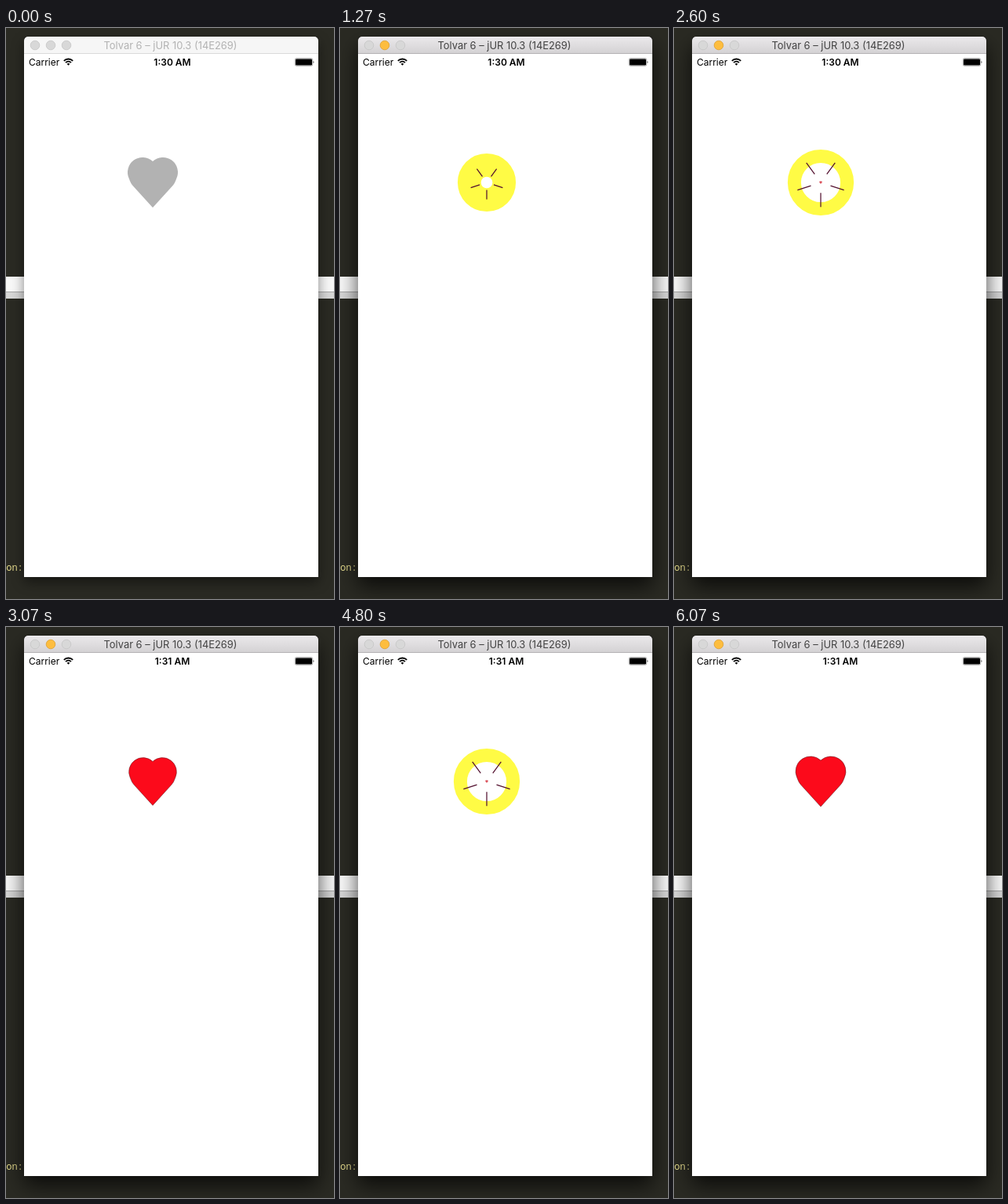
Animation of 418x728 px, one loop 6140 ms. Source, as an HTML page:

```html
<!DOCTYPE html>
<html lang="en">
<head>
<meta charset="utf-8">
<title>Like button</title>
<style>
  html, body { margin: 0; width: 100%; height: 100%; overflow: hidden; background: #2a2a23; }
  svg { display: block; width: 418px; height: 728px; font: 12px Inter, Roboto, sans-serif; }
  #shadow { filter: drop-shadow(0 7px 8px rgba(0, 0, 0, .45)); }
  #bar { fill: #f6f6f6; }
  #title { font-size: 12.9px; fill: #b2b2b2; text-anchor: middle; }
  .light { fill: #d8d8d8; stroke: #c6c6c6; stroke-width: .8; }
  .active #shadow { filter: drop-shadow(0 12px 13px rgba(0, 0, 0, .7)); }
  .active #bar { fill: url(#metal); }
  .active #title { fill: #424242; }
  .active #edge { stroke: #b4b2b4; }
  .active .yellow { fill: #fdbd3f; stroke: #dda033; }
  #edge { stroke: #dadada; }
  #clock { font-weight: 600; text-anchor: middle; }
  #code { font: 12px "Noto Sans Mono", "DejaVu Sans Mono", monospace; fill: #e3d98c; }
</style>
</head>
<body>
<svg id="stage" viewBox="0 0 418 728">
  <defs>
    <linearGradient id="metal" x2="0" y2="1">
      <stop stop-color="#ebe9eb"/><stop offset="1" stop-color="#d3d1d3"/>
    </linearGradient>
  </defs>
  <rect width="418" height="728" fill="#2a2a23"/>
  <rect y="317" width="418" height="19" fill="#f7f7f7"/>
  <rect y="336" width="418" height="1" fill="#a5a5a5"/>
  <rect y="337" width="418" height="8" fill="#d6d6d6"/>
  <text id="code" x="-7" y="692">ion:</text>

  <rect id="shadow" x="23" y="11" width="375" height="689" rx="4"/>
  <rect x="23" y="30" width="375" height="670" fill="#fff"/>
  <path id="bar" d="M23 33V16a5 5 0 0 1 5-5H393a5 5 0 0 1 5 5V33Z"/>
  <path id="edge" d="M23 32.5H398"/>
  <circle class="light" cx="37" cy="22" r="5.8"/>
  <circle class="light yellow" cx="57" cy="22" r="5.8"/>
  <circle class="light" cx="77" cy="22" r="5.8"/>
  <text id="title" x="209.5" y="27">Tolvar 6 – jUR 10.3 (14E269)</text>

  <text x="29" y="47.5">Carrier</text>
  <g fill="none" stroke="#000" stroke-width="1.8">
    <path d="M73.8 41.8a8.2 8.2 0 0 1 11.4 0M76 44.2a5 5 0 0 1 7 0"/>
    <path d="M79.5 47.8l-1.9-2a2.8 2.8 0 0 1 3.8 0Z" fill="#000" stroke="none"/>
  </g>
  <text id="clock" x="212" y="47.5"></text>
  <rect x="368.2" y="38.7" width="22.6" height="9.6" rx="2" fill="none" stroke="#888" stroke-width=".7"/>
  <rect x="369" y="39.5" width="21" height="8" rx="1.2"/>
  <path d="M391.6 42q1.8 1.5 0 3Z"/>

  <g id="button" transform="translate(187 197)">
    <circle id="ring" fill="none" stroke="#fffb45"/>
    <path id="lines" stroke="#541230" stroke-width="1.25"/>
    <path id="heart" stroke-width=".7" d="M0 32L-25 4.5Q-28 1.5-30.2-5A19 19 0 0 1 0-26.9A19 19 0 0 1 30.2-5Q28 1.5 25 4.5Z"/>
  </g>
</svg>
<script>
const LOOP = 6140, FOCUS = 1000, MINUTE = 2870, SIZE = 64;
const GRAY = [178, 178, 178], RED = [252, 10, 27];
// Press and release of each tap; taps alternate between like and unlike.
const TAPS = [[1067, 1178], [1970, 2070], [2325, 2460], [3790, 3940], [4470, 4660]];

// Keyframes are flat lists: time, value, time, value...
const RING = [0, 0, 1, .5, 2, 1, 3, 1.2, 4, 1.3, 5, 1.37, 6, 1.4];
const HOLE = [0, 0, 2, 0, 3, 1.25, 4, 2.688, 5, 3.923, 6, 4.375, 7, 4.731, 9, 5];
const TAIL = [1, 0, 2, .18, 3, .2, 4, .26, 5, .32, 6, .4, 7, .6, 8, .71, 17, .89, 18, .92];
const HEAD = [1, 0, 2, .32, 3, .48, 4, .64, 5, .68, 17, .92];
const FADE = [12, 1, 17, 0];
const BOUNCE = [4, 0, 9, 1.2, 10, 1.25, 11, 1.2, 14, .9, 15, .875, 16, .875, 17, .9, 20, 1.013,
  21, 1.025, 22, 1.013, 25, .96, 26, .95, 27, .96, 29, .99, 30, 1];

const $ = id => document.getElementById(id);
const set = (id, attrs) => {
  for (const name in attrs) $(id).setAttribute(name, attrs[name]);
};

function track(keys, x) {
  if (x <= keys[0]) return keys[1];
  for (let i = 2; i < keys.length; i += 2) {
    if (x < keys[i]) {
      const k = (x - keys[i - 2]) / (keys[i] - keys[i - 2]);
      return keys[i - 1] + k * (keys[i + 1] - keys[i - 1]);
    }
  }
  return keys[keys.length - 1];
}

function spokes(from, to) {
  let d = '';
  for (let i = 0; i < 5; i++) {
    const a = Math.PI / 5 * (2 * i + 1), x = Math.sin(a), y = -Math.cos(a);
    d += `M${x * from} ${y * from}L${x * to} ${y * to}`;
  }
  return d;
}

function drawBurst(age) {
  const r = SIZE / 2 * track(RING, age / .0333);
  const hole = Math.min(1, track(HOLE, age / .0333) / 5);
  set('ring', { r: r * (1 + hole) / 2, 'stroke-width': r * (1 - hole) });
  const step = age / .6 * 18, reach = SIZE * .75;
  set('lines', {
    d: spokes(reach * track(TAIL, step), reach * track(HEAD, step)),
    opacity: track(FADE, age * 30)
  });
}

function draw(now) {
  const t = now % LOOP;
  const done = TAPS.filter(tap => t >= tap[1]).length;
  const liked = done % 2 === 1;
  const age = done ? (t - TAPS[done - 1][1]) / 1000 : 0;
  const pressed = TAPS.some(([down, up]) => t >= down && t < up);

  $('stage').classList.toggle('active', t >= FOCUS);
  $('clock').textContent = t < MINUTE ? '1:30 AM' : '1:31 AM';
  set('button', { opacity: pressed ? .4 : 1 });

  drawBurst(liked ? age : 0);
  const blend = Math.min(1, age / .25), red = liked ? blend : done ? 1 - blend : 0;
  const color = GRAY.map((c, i) => Math.round(c + (RED[i] - c) * red));
  set('heart', {
    fill: `rgb(${color})`,
    stroke: `rgba(95, 30, 35, ${red * .8})`,
    transform: `scale(${liked ? track(BOUNCE, age * 30) : 1})`
  });
}

const start = performance.now();
function tick() {
  draw(performance.now() - start);
  requestAnimationFrame(tick);
}
tick();
</script>
</body>
</html>
```
